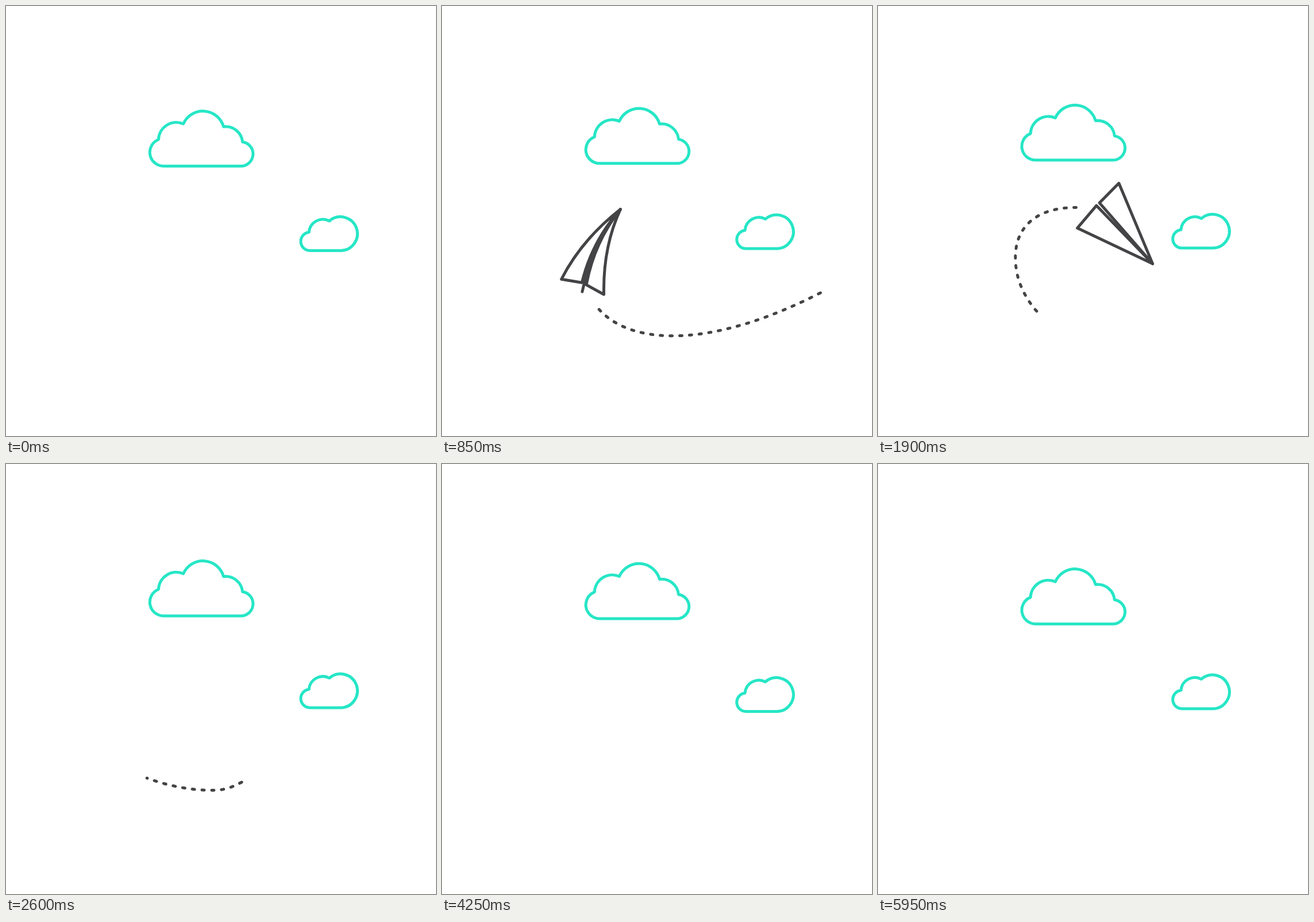
An HTML page that plays this animation: 748x748 px, repeating every 6 s.

```html
<!DOCTYPE html>
<html lang="en">
<head>
<meta charset="utf-8">
<title>Paper plane</title>
<style>
  html, body { margin: 0; width: 100%; height: 100%; overflow: hidden; background: #fff; }
  svg { display: block; width: 100%; height: 100%; }
  path { stroke-width: 5; stroke-linecap: round; stroke-linejoin: round; fill: none; }
  .cloud { stroke: #26e6c6; }
  .ink { stroke: #444346; }
  .wing { fill: #fff; }
</style>
</head>
<body>
<svg viewBox="0 0 748 748">
  <path id="bigCloud" class="cloud" d="M274 278.5A24 24 0 0 1 265.3 232.2A31 31 0 0 1 308.5 205
    A37.3 37.3 0 0 1 378.5 210A29.6 29.6 0 0 1 411.5 236.5A21.1 21.1 0 0 1 408.5 278.5Z"/>
  <path id="smallCloud" class="cloud" d="M529 425.5A16 16 0 0 1 527 393.6A24.2 24.2 0 0 1 562.5 374
    A29.4 29.4 0 1 1 582.3 425.5Z"/>
  <path id="trail" class="ink"/>
  <g id="plane">
    <path id="left" class="ink wing"/>
    <path id="right" class="ink wing"/>
    <path id="keel" class="ink"/>
  </g>
</svg>
<script>
const LOOP = 6000, STEP = 50, EXIT = 2590;
const $ = id => document.getElementById(id);
const clamp = v => Math.max(0, Math.min(1, v));

// Flight route: one curve per line
const curves = [
  'C469 596 330 591 273.2 527.8',
  'C250 499 239 470 239 437',
  'C239 385 275 350 345 350.5',
  'C425 325 476 385 478.5 460',
  'C478.5 510 446 536 410 553.5',
  'C392 562.5 382 567.5 359 567.5',
  'C315 568 245 556 176.5 512',
  'C150 502 128 493 109 486'
];
const route = document.createElementNS('http://www.w3.org/2000/svg', 'path');
const ends = [0];
curves.reduce((d, c) => {
  route.setAttribute('d', d + c);
  ends.push(route.getTotalLength());
  return d + c;
}, 'M658.3 499');
const point = s => route.getPointAtLength(s);

// 2.5 means halfway along the third curve
function arc(u) {
  const i = Math.min(Math.floor(u), curves.length - 1);
  return ends[i] + (ends[i + 1] - ends[i]) * (u - i);
}

// Position on the route at time t, moving evenly between [time, place] keys
function travel(keys, t) {
  let s = arc(keys[0][1]);
  for (let i = 1; i < keys.length; i++) {
    const [t0, u0] = keys[i - 1], [t1, u1] = keys[i];
    s += (arc(u1) - arc(u0)) * clamp((t - t0) / (t1 - t0));
  }
  return s;
}
const noseKeys = [[50, 0], [850, 2.775], [1900, 3.943], [EXIT, 8]];
const headKeys = [[250, 0], [850, 1], [1900, 3], [2708, 7]];
const tailKeys = [[1350, 0], [1900, 0.99], [2600, 5], [2950, 7]];

const dash = ends[1] / 412;
$('trail').setAttribute('stroke-dasharray', `${4 * dash} ${13 * dash}`);

function drawTrail(t) {
  const from = travel(tailKeys, t), span = travel(headKeys, t) - from;
  const n = Math.ceil(span / 4);
  let line = '';
  for (let i = 0; span > 1 && i <= n; i++) {
    const p = point(from + span * i / n);
    line += `${i ? 'L' : 'M'}${p.x.toFixed(2)} ${p.y.toFixed(2)}`;
  }
  $('trail').setAttribute('d', line);
}

// Wings fold and curve while the plane swings round
const pulse = (t, mid, width) => Math.cos(Math.PI / 2 * Math.min(1, Math.abs(t - mid) / width));
const banking = t => pulse(t, 850, 600) + pulse(t, 2250, 320);

function drawPlane(t) {
  const bank = banking(t);
  const size = 140.6 + 3.4 * bank;

  // Nose and tail both ride on the route, one plane length apart
  let s = travel(noseKeys, t);
  const nose = point(s);
  let tail = nose, reach = 0;
  while (s > 0 && reach < size) {
    tail = point(s -= 0.5);
    reach = Math.hypot(nose.x - tail.x, nose.y - tail.y);
  }
  const scale = Math.min(1, reach / size) * clamp((EXIT - t) / 80);
  $('plane').style.display = scale > 0 ? '' : 'none';
  if (scale <= 0) return;
  const heading = Math.atan2(nose.y - tail.y, nose.x - tail.x) * 180 / Math.PI;
  $('plane').setAttribute('transform',
    `translate(${nose.x} ${nose.y}) rotate(${heading}) scale(${scale}) translate(${-size} 0)`);

  const open = 1 - bank, bend = -18 * bank, keel = 14 * bank;
  const bow = (x, y) => `Q${(size + x) / 2} ${y / 2 + bend} ${x} ${y}`;
  const wing = side => {
    const x = 8 * open - 6 + side * 4.3;
    const y = side * (39 + 14 * open) + 1.5 * open;
    const inner = side * (4.3 - 0.8 * open);
    return `M${size} 0${bow(x, y)}L0 ${inner}Q${size / 2} ${inner / 2 + bend} ${size} 0Z`;
  };
  $('left').setAttribute('d', wing(-1));
  $('right').setAttribute('d', wing(1));
  $('keel').setAttribute('d', `M${size} 0${bow(0, 0)}L${-keel} ${keel * 0.22}`);
  $('keel').style.opacity = clamp(keel / 5);
}

// Triangle wave from 0 to 1 and back
const bob = t => 1 - Math.abs(t % LOOP / (LOOP / 2) - 1);

function draw(t) {
  $('bigCloud').setAttribute('transform', `translate(0 ${-16.4 * bob(t)})`);
  $('smallCloud').setAttribute('transform', `translate(0 ${6 - 12 * bob(t + LOOP / 4)})`);
  drawTrail(t);
  drawPlane(t);
}

const begin = performance.now();
function tick() {
  const t = (performance.now() - begin) % LOOP;
  draw(Math.floor(t / STEP) * STEP);
  requestAnimationFrame(tick);
}
tick();
</script>
</body>
</html>
```
